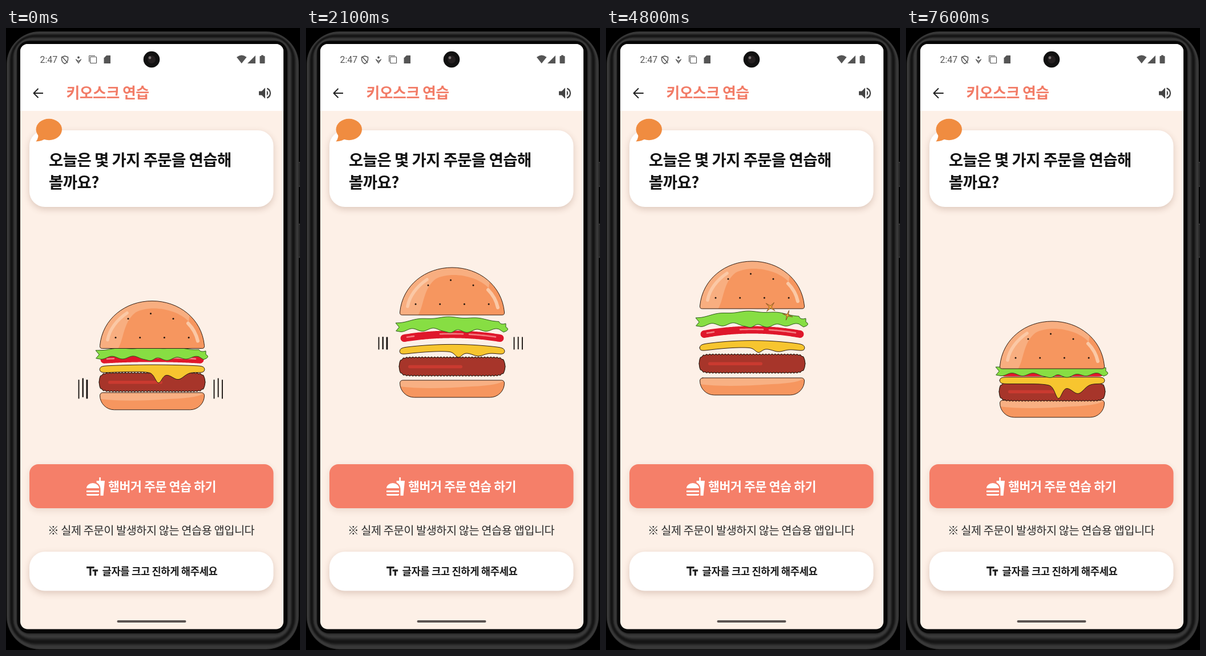
Write an HTML page with a canvas that moves like this. It is 515x1088 px and loops after 7700 ms.

```html
<!DOCTYPE html>
<html lang="ko">
<head>
<meta charset="utf-8">
<title>주문 연습</title>
<style>
html, body { margin: 0; width: 100%; height: 100%; overflow: hidden; background: #000; }
canvas { display: block; width: 515px; height: 1088px; }
</style>
</head>
<body>
<canvas id="stage"></canvas>
<script>
const W = 515, H = 1088, LOOP = 7700, STEP = 100, CYCLE = 6100 / 3;
const canvas = document.getElementById('stage');
const ctx = canvas.getContext('2d');
const dpr = window.devicePixelRatio || 1;
canvas.width = W * dpr;
canvas.height = H * dpr;

const INK = '#2e1d13', GREY = '#555';
const KO = '"Noto Sans CJK KR", "Noto Sans CJK", "Noto Sans", sans-serif';

const clamp = v => Math.min(1, Math.max(0, v));
const smooth = v => { const p = clamp(v); return p * p * (3 - 2 * p); };
const mix = (a, b, f) => a + (b - a) * f;
const bump = (x, center, width) => Math.exp(-(((x - center) / width) ** 2));
const bow = x => Math.max(0, 1 - ((x - 256) / 92) ** 2);

function paint(fill, stroke, width = 1) {
  if (fill) { ctx.fillStyle = fill; ctx.fill(); }
  if (stroke) { ctx.strokeStyle = stroke; ctx.lineWidth = width; ctx.stroke(); }
}

function box(x, y, w, h, r, fill, stroke, width) {
  ctx.beginPath();
  ctx.roundRect(x, y, w, h, r);
  paint(fill, stroke, width);
}

function shape(d, fill, stroke, width = 1) {
  const p = new Path2D(d);
  if (fill) { ctx.fillStyle = fill; ctx.fill(p); }
  if (stroke) { ctx.strokeStyle = stroke; ctx.lineWidth = width; ctx.stroke(p); }
}

function dot(x, y, r, fill) {
  ctx.beginPath();
  ctx.arc(x, y, r, 0, 7);
  paint(fill);
}

function text(str, x, y, size, weight, color, family = KO, gap = -0.02) {
  ctx.font = `${weight} ${size}px ${family}`;
  ctx.letterSpacing = `${size * gap}px`;
  ctx.fillStyle = color;
  ctx.fillText(str, x, y);
}

function panel(y, h, r, fill, shade) {
  ctx.save();
  ctx.shadowColor = `rgba(120,70,50,${shade})`;
  ctx.shadowBlur = 12 * dpr;
  ctx.shadowOffsetY = 4 * dpr;
  box(41, y, 427.5, h, r, fill);
  ctx.restore();
}

function drawPhone() {
  ctx.fillStyle = '#000';
  ctx.fillRect(0, 0, W, H);
  box(511, 235, 6, 42, 2, '#262626', GREY);
  box(511, 343, 6, 58, 2, '#262626', GREY);
  // Metal rim: nested rings with two soft light bands
  for (let f = 0; f <= 1; f += .04) {
    const v = f > .85 ? 6 : 20 + 38 * Math.cos(Math.PI * (f - .1) / .6) ** 2;
    const x = mix(1, 22, f), y = mix(6, 25, f);
    box(x, y, mix(513, 490, f) - x, mix(1087, 1055, f) - y, mix(58, 16, f), `rgb(${v},${v},${v})`);
  }
  box(25, 28, 461, 1023.5, 13, '#fdf0e7');
  box(25, 28, 461, 117, [13, 13, 0, 0], '#fff');
}

function drawStatus() {
  text('2:47', 59.5, 61, 16, 400, GREY, 'Roboto, sans-serif', 0);
  shape('M103 49L108.5 51V55Q108 60 103 62.5Q98 60 97.5 55V51ZM99 51L108 61', null, GREY, 1.5);
  dot(127, 51.5, 1.9, GREY);
  shape('M122.5 55L127 58.5L131.5 55L127 61.5Z', null, GREY, 1.3);
  box(147.5, 50.5, 11, 11, 1, null, GREY, 1.2);
  shape('M145.5 59V48.5H156', null, GREY);
  shape('M176 48H183V62H171.5V52.5Z', GREY);
  shape('M404 51Q412.7 44 421.5 51L412.7 62Z', GREY);
  shape('M437 48V62H423Z', GREY);
  box(444.5, 49, 9, 13, 1, GREY);
  box(447, 47.5, 4, 3, 0, GREY);

  dot(255, 55, 14.3, '#111');
  dot(255, 55, 7, '#241f20');
  dot(252, 52, 2.4, '#77706f');
}

function backIcon() {
  shape('M65 114H50M56.5 106L48.5 114L56.5 122', null, '#222', 2);
}

function soundIcon() {
  shape('M443 110.5H448L454 104.5V123.5L448 117.5H443Z', '#444');
  ctx.beginPath();
  ctx.arc(454, 114, 5.2, -1, 1);
  paint('#444');
  ctx.beginPath();
  ctx.arc(454, 114, 9, -1.2, 1.2);
  paint(null, '#444', 2.2);
}

function foodIcon() {
  ctx.beginPath();
  ctx.ellipse(152, 805, 11, 9, 0, Math.PI, 0);
  paint('#fff');
  box(141, 809, 22, 3, 0, '#fff');
  box(141, 815, 22, 3, [0, 0, 2, 2], '#fff');
  box(163.3, 786, 2.6, 7, 0, '#fff');
  shape('M158.4 792H173L170.5 818H165.5V806Q165 798 158.8 795.5Z', '#fff');
}

function letterT(x, y, w) {
  box(x, y, w, 3.2, 0, '#222');
  box(x + w / 2 - 1.6, y, 3.2, 958 - y, 0, '#222');
}

function drawPage() {
  backIcon();
  text('키오스크 연습', 105.5, 122.5, 25.9, 700, '#f27c67');
  soundIcon();

  panel(179, 134, 27, '#fff', .24);
  ctx.beginPath();
  ctx.ellipse(75.3, 177.5, 22.7, 18.8, 0, 0, 7);
  paint('#f08c40');
  shape('M56 183Q58 192 52.5 198.5Q63 198 70 193Z', '#f08c40');
  text('오늘은 몇 가지 주문을 연습해', 75, 241, 27.5, 700, '#111');
  text('볼까요?', 75, 280, 27.5, 700, '#111');

  panel(763, 77, 16, '#f57f69', .14);
  foodIcon();
  text('햄버거 주문 연습 하기', 179, 809.5, 21.7, 700, '#fff');

  text('※ 실제 주문이 발생하지 않는 연습용 앱입니다', 73, 885.5, 19.7, 400, '#2a2a2a');

  panel(916, 68.5, 27, '#fff', .24);
  letterT(141, 942, 13.6);
  letterT(151.6, 947.3, 9.5);
  text('글자를 크고 진하게 해주세요', 168.5, 956.5, 17.7, 700, '#1a1a1a');
  box(194.5, 1036, 121, 4, 2, '#5b5351');
}

// Closed outline between two curves top(x) and low(x)
function slab(x0, x1, top, low, fill, width = 1) {
  ctx.beginPath();
  for (let x = x0; x <= x1; x++) ctx.lineTo(x, top(x));
  for (let x = x1; x >= x0; x--) ctx.lineTo(x, low(x));
  ctx.closePath();
  ctx.lineJoin = 'round';
  paint(fill, INK, width);
}

// Half height of a bar with rounded ends
const pill = (x, half) => half * Math.sqrt(1 - Math.min(1, Math.abs((x - 256) / 92)) ** 26);

function arcBand(x0, x1, y, arch, width, color) {
  ctx.beginPath();
  for (let x = x0; x <= x1; x += 2) ctx.lineTo(x, y - arch * bow(x));
  ctx.lineCap = 'round';
  paint(null, color, width);
}

function bottomBun(y) {
  const r = [5, 5, 25, 25];
  ctx.save();
  box(164.5, y, 183, 30, r, '#f6965f');
  ctx.clip();
  ctx.translate(0, y);
  shape('M164 0H348Q340 9 290 11Q210 17 164 11Z', '#f8b083');
  ctx.restore();
  box(164.5, y, 183, 30, r, null, INK);
}

function patty(y) {
  const half = x => 16 * Math.sqrt(1 - Math.abs((x - 256) / 93) ** 18) + .8 * Math.sin(x * 1.15);
  slab(163, 349, x => y - half(x), x => y + half(x), '#a7352a', 1.2);
  box(179, y - 2.5, 95, 5.5, 2.7, '#ca3a30');
}

function cheese(y, k) {
  const drip = x => 20 * bump(x, 267, 8) + 15 * bump(x, 302, 14) + 6 * bump(x, 275, 25);
  slab(164, 348,
    x => y - pill(x, 5.8) - 7 * k * bow(x),
    x => y + pill(x, 6) - 7 * k * bow(x) + drip(x) * (1 - .65 * k),
    '#f7c52f');
}

function tomato(y, k) {
  const a = 9 * k;
  arcBand(172, 340, y, a, 13, '#df172b');
  for (const [x, w] of [[177, 13], [235, 41], [286, 46]]) arcBand(x, x + w, y - 1, a, 2.6, '#f47c82');
}

function lettuce(y, k) {
  const top = x => y - 8 + Math.sin(x * .12) - 10 * k * bow(x);
  const low = x => y + 6 + 2.5 * Math.sin((x - 158) * .17) + 7 * bump(x, 255, 9) + 4 * bump(x, 288, 12) - 2 * k * bow(x);
  ctx.beginPath();
  ctx.moveTo(163, y);
  ctx.lineTo(157, y - 7);
  for (let x = 166; x <= 338; x += 2) ctx.lineTo(x, top(x));
  ctx.quadraticCurveTo(340, y - 3, 350, y - 6);
  ctx.lineTo(350, y);
  ctx.quadraticCurveTo(359, y + 5, 346, y + 9);
  for (let x = 338; x >= 166; x -= 2) ctx.lineTo(x, low(x));
  ctx.lineTo(158, y + 7);
  ctx.closePath();
  ctx.lineJoin = 'round';
  paint('#87de43', '#2f5a1c');
}

const DOME = 'M168 83Q164 83 164.5 78C169 31 209 0 256 0S343 31 347.5 78Q348 83 344 83Z';

function topBun(y) {
  ctx.save();
  ctx.translate(0, y);
  shape(DOME, '#f6965f');
  ctx.save();
  ctx.clip(new Path2D(DOME));
  shape('M160 84H196C207 66 205 37 227 20C253 6 300 14 320 36L325 0H160Z', '#f8ae80');
  ctx.restore();
  ctx.lineCap = 'round';
  shape('M178 68C181 50 194 33 212 21', null, '#fbc8a5', 5.5);
  shape('M319 39Q332 52 336 70', null, '#fbc8a5', 6);
  shape(DOME, null, INK);
  for (let i = 0; i < 3; i++) dot(214 + 39.5 * i, 22 + 9 * (i - 1) ** 2, 1.5, '#20140d');
  for (let i = 0; i < 4; i++) dot(192 + 42.7 * i, 64, 1.5, '#20140d');
  ctx.restore();
}

function speedLines(k) {
  const head = 660.5 - 134 * k, tail = 660 - 30 * k - 110 * k ** 4;
  if (k < .01 || tail <= head) return;
  ctx.lineCap = 'butt';
  for (const side of [0, 1]) {
    for (let i = 0; i < 3; i++) {
      const x = 127.5 + side * 237 + i * 7.2, rise = i === 1 ? 4 * (1 - k) : 0;
      ctx.beginPath();
      ctx.moveTo(x, head - rise);
      ctx.lineTo(x, tail - rise);
      paint(null, '#100c0a', side ? 1.8 : 1.8 + i * .5);
    }
  }
}

function sparkle(x, y, r, turn) {
  if (r <= 0) return;
  ctx.beginPath();
  for (let i = 0; i < 8; i++) {
    const d = i % 2 ? r * .2 : r, a = turn + i * Math.PI / 4;
    ctx.lineTo(x + d * Math.cos(a), y + d * Math.sin(a));
  }
  ctx.closePath();
  paint('#f5a83c', '#7a4a20', .9);
}

function drawBurger(u) {
  const rise = smooth(clamp((u + 247) / 338) ** 3);
  const k = rise - smooth((u - 950) / 250);
  const shine = smooth((u - 430) / 150) - smooth((u - 800) / 120);
  bottomBun(651 - 39 * k);
  patty(636 - 49 * k);
  cheese(616.5 - 57 * k, k);
  tomato(603 - 66 * k, k);
  lettuce(600 - 86 * k, k);
  topBun(513 - 105 * k);
  if (u < 150) speedLines(k);
  sparkle(288, 488, 10 * shine, .7);
  sparkle(318, 502.5, 9 * shine, .3);
}

function draw(t) {
  ctx.setTransform(dpr, 0, 0, dpr, 0, 0);
  drawPhone();
  drawStatus();
  drawPage();
  drawBurger((t + 200) % CYCLE - 200);
}

const start = performance.now();
function tick() {
  const t = (performance.now() - start) % LOOP;
  draw(Math.floor(t / STEP) * STEP);
  requestAnimationFrame(tick);
}
tick();
</script>
</body>
</html>
```
